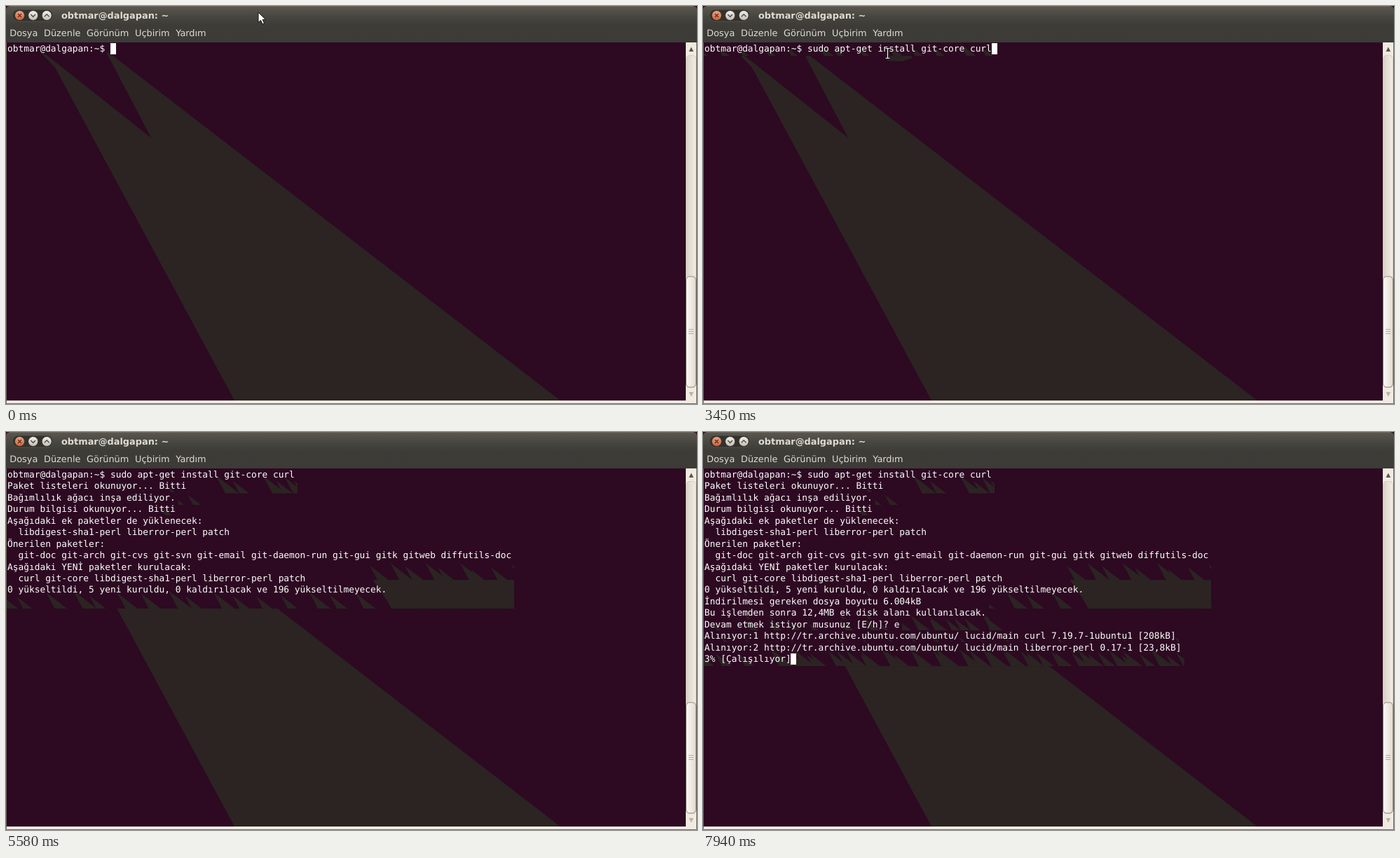
An HTML page with a canvas for the animation above (8000 ms loop, 986 px wide and 568 px high).

```html
<!DOCTYPE html>
<html lang="tr">
<head>
<meta charset="utf-8">
<title>Terminal</title>
<style>
  html, body { margin: 0; width: 100%; height: 100%; overflow: hidden; background: #2d0922; }
  #stage { position: relative; width: 986px; height: 568px; overflow: hidden; text-rendering: geometricPrecision; }
  #stage > * { position: absolute; }
  #chrome, #backdrop { left: 0; top: 0; }
  .bar { font: 12.89px/16px "DejaVu Sans", sans-serif; color: #dfdbd2; white-space: pre; }
  .title { left: 79px; top: 7px; font-weight: bold; }
  .menu { left: 5.3px; top: 32px; display: flex; gap: 8.7px; }
  #screen {
    left: 2px; top: 54px; margin: 0; color: #fff;
    font: 12.85px/16.43px "DejaVu Sans Mono", monospace; font-variant-ligatures: none;
  }
  #caret { width: 8px; height: 16.4px; background: #fff; }
  #mouse { left: 0; top: 0; overflow: visible; }
</style>
</head>
<body>
<div id="stage">
  <canvas id="backdrop" width="986" height="568"></canvas>
  <svg id="chrome" width="986" height="568">
    <defs>
      <linearGradient id="head" x2="0" y2="1">
        <stop offset="0" stop-color="#5b584f"/><stop offset=".28" stop-color="#474640"/>
        <stop offset=".52" stop-color="#3d3c37"/><stop offset="1" stop-color="#3c3b37"/>
      </linearGradient>
      <linearGradient id="trough">
        <stop offset="0" stop-color="#d9d1c5"/><stop offset="1" stop-color="#f3ede4"/>
      </linearGradient>
      <linearGradient id="thumb">
        <stop offset="0" stop-color="#fbf9f6"/><stop offset="1" stop-color="#e3dacd"/>
      </linearGradient>
      <linearGradient id="close" x2="0" y2="1">
        <stop offset="0" stop-color="#eaa78a"/><stop offset="1" stop-color="#cb6339"/>
      </linearGradient>
      <linearGradient id="button" x2="0" y2="1">
        <stop offset="0" stop-color="#f3f1ec"/><stop offset="1" stop-color="#c2bdb2"/>
      </linearGradient>
    </defs>
    <path d="M0 52V6Q0 0 6 0H980Q986 0 986 6V52Z" fill="url(#head)"/>
    <path d="M5 .5H981" stroke="#6d6960"/>
    <rect x="9" y="5" width="58" height="17" rx="8.5" fill="#33322d" stroke="#53514a"/>
    <g stroke="#2b2a26" stroke-width=".8">
      <circle cx="19.5" cy="13.5" r="7" fill="url(#close)"/>
      <circle cx="38.7" cy="13.5" r="7" fill="url(#button)"/>
      <circle cx="58.2" cy="13.5" r="7" fill="url(#button)"/>
    </g>
    <g fill="none" stroke="#55524a" stroke-width="1.5">
      <path d="M17 11l5 5m0-5l-5 5" stroke="#70301a"/>
      <path d="M35.3 12l3.4 3.4 3.4-3.4M54.8 15.2l3.4-3.4 3.4 3.4"/>
    </g>
    <rect x="970" y="52" width="15" height="512" fill="#f0eae0"/>
    <rect x="970.5" y="70.5" width="14" height="474" rx="5" fill="url(#trough)" stroke="#d5cdc0"/>
    <rect x="970.5" y="386" width="14" height="158" rx="5" fill="url(#thumb)" stroke="#91887c"/>
    <path d="M974 461.5h7m-7 3h7m-7 3h7" stroke="#b5ab9d"/>
    <path d="M974.5 65l3.3-6.5 3.3 6.5Z" fill="#5b554d"/>
    <path d="M974.5 551l3.3 6.5 3.3-6.5Z" fill="#bbb2a5"/>
    <rect y="563" width="986" height="5" fill="#f0eae0"/>
    <path d="M.5 52V567.5H985.5V52" fill="none" stroke="#6b665d"/>
  </svg>
  <div class="bar title">obtmar@dalgapan: ~</div>
  <div class="bar menu">
    <span>Dosya</span><span>Düzenle</span><span>Görünüm</span><span>Uçbirim</span><span>Yardım</span>
  </div>
  <div id="caret"></div>
  <pre id="screen"></pre>
  <svg id="mouse" width="1" height="1">
    <path id="arrow" d="M.5 .5V15L4 11.8 6.4 17.2 9 16 6.6 10.8H11Z" fill="#fff" stroke="#111"/>
    <g id="beam" fill="none">
      <path d="M-3.5-7H3.5M0-7V7M-3.5 7H3.5" stroke="#111" stroke-width="3"/>
      <path d="M-3-7H3M0-7V7M-3 7H3" stroke="#fff" stroke-width="1.2"/>
    </g>
  </svg>
</div>
<script>
const LOOP = 8000, TOP = 53, ROW = 16.43, LEFT = 2, COL = 7.736;
const BLINK_OFF = 580, BLINK = 1190;
const PURPLE = '#2d0922', GREY = '#2b2422';
const $ = id => document.getElementById(id);
const ctx = $('backdrop').getContext('2d');
const rowY = row => TOP + row * ROW;
const endX = line => LEFT + line.length * COL;

const prompt = 'obtmar@dalgapan:~$ ';
const command = prompt + 'sudo apt-get install git-core curl';
const reading = 'Paket listeleri okunuyor... ';
const tree = 'Bağımlılık ağacı inşa ediliyor.';
const mirror = 'http://tr.archive.ubuntu.com/ubuntu/ lucid/main ';
const question = 'Devam etmek istiyor musunuz [E/h]? ';

// The caret stands after the last line written and first hides after `lag` ms
const writes = [];
const write = (at, row, lines, lag = 595) => writes.push({ at, row, lines, lag });

write(0, 0, [prompt], 305);
write(2650, 0, [command], 215);
write(4630, 0, [command, '']);
write(4760, 1, [reading + '%0']);
write(5010, 1, [reading + '%27']);
write(5080, 1, [reading + '%84']);
write(5150, 1, [reading + 'Bitti', tree + '.. %0']);
write(5210, 2, [tree + '.. %50']);
write(5380, 2, [tree, 'Durum bilgisi okunuyor... Bitti', '']);
write(5580, 4, [
  'Aşağıdaki ek paketler de yüklenecek:',
  '  libdigest-sha1-perl liberror-perl patch',
  'Önerilen paketler:',
  '  git-doc git-arch git-cvs git-svn git-email git-daemon-run git-gui gitk gitweb diffutils-doc',
  'Aşağıdaki YENİ paketler kurulacak:',
  '  curl git-core libdigest-sha1-perl liberror-perl patch',
  '0 yükseltildi, 5 yeni kuruldu, 0 kaldırılacak ve 196 yükseltilmeyecek.',
  ''
], 0);
write(5620, 11, [
  'İndirilmesi gereken dosya boyutu 6.004kB',
  'Bu işlemden sonra 12,4MB ek disk alanı kullanılacak.',
  question
], 215);
write(6750, 13, [question + 'e']);
write(7690, 14, ['']);
write(7780, 14, [`Alınıyor:1 ${mirror}curl 7.19.7-1ubuntu1 [208kB]`, '0% [Çalışılıyor]']);
write(7940, 15, [`Alınıyor:2 ${mirror}liberror-perl 0.17-1 [23,8kB]`, '3% [Çalışılıyor]']);

function fill(color, ...points) {
  ctx.fillStyle = color;
  ctx.beginPath();
  points.forEach(([x, y]) => ctx.lineTo(x, y));
  ctx.fill();
}

function random(seed) {
  const v = Math.sin(seed * 12.9898) * 43758.5453;
  return v - Math.floor(v);
}

// A small copy of the wallpaper wedge
const shard = (x, y, h) => fill(GREY, [x, y], [x + .53 * h, y + h], [x + 1.3 * h, y + h]);

function shards(from, to, bottom, height, gap) {
  for (let x = from; x < to; x += gap) {
    const k = random(x + bottom), h = height * (.6 + .4 * k);
    shard(x + gap * .4 * k, bottom - h, h);
  }
}

// Written rows are repainted purple; the wallpaper returns in shards
// along the bottom and beside the lines shorter than the longest one.
function repaint({ row, lines }) {
  const widest = lines.reduce((best, line, i) => line.length > lines[best].length ? i : best, 0);
  const last = lines.filter(Boolean).pop() || '';
  const top = rowY(row), bottom = rowY(row + lines.length) + 2;
  const right = endX(lines[widest]) + 4;
  const open = rowY(row + widest + 1) + 2;
  ctx.save();
  ctx.beginPath();
  ctx.rect(0, top, right, bottom - top);
  ctx.clip();
  ctx.fillStyle = PURPLE;
  ctx.fillRect(0, top, right, bottom - top);
  shards(-20, right, bottom, Math.min(ROW * 1.6, bottom - top), 34);
  if (open < bottom) {
    const solid = open + 1.5 * ROW, x = endX(last);
    shards(x - 30, right, Math.min(solid, bottom), 1.5 * ROW, 25);
    if (solid < bottom) fill(GREY, [x - 20, solid], [x + 8, bottom], [right, bottom], [right, solid]);
  }
  ctx.restore();
}

function drawBackdrop(t) {
  ctx.fillStyle = PURPLE;
  ctx.fillRect(0, 0, 986, 568);
  fill(GREY, [49, 66], [58, 70], [207, 188], [143, 66], [150, 69], [791, 563], [326, 563], [70, 88]);
  if (t >= 900) {
    fill(GREY, [262, 66], [274, 70], [300, 70], [297, 75], [283, 79], [263, 78]);
    shard(312, 58, 10);
  }
  writes.slice(1).filter(w => w.at <= t).forEach(repaint);
}

function drawMouse(t) {
  const s = t < 230 ? 0 : Math.min(17, Math.floor((t - 230) / 41.8) + 1) / 17;
  const u = 1 - s;
  const bezier = (a, b, c, d) => u * u * u * a + 3 * u * u * s * b + 3 * u * s * s * c + s * s * s * d;
  const x = Math.round(bezier(359, 350, 310, 263)), y = Math.round(bezier(8, 40, 80, 67));
  const overText = y > 52;
  $('mouse').style.transform = `translate(${x + .5}px, ${y + .5}px)`;
  $('mouse').style.display = t < 4630 ? '' : 'none';
  $('arrow').style.display = overText ? 'none' : '';
  $('beam').style.display = overText ? '' : 'none';
}

function drawText(t) {
  const past = writes.filter(w => w.at <= t), screen = [];
  for (const { row, lines } of past) lines.forEach((line, i) => screen[row + i] = line);
  $('screen').textContent = screen.join('\n');

  const { at, row, lines, lag } = past.pop();
  const age = t - at - lag;
  const caret = $('caret').style;
  caret.display = age >= 0 && age % BLINK < BLINK_OFF ? 'none' : '';
  caret.left = Math.floor(endX(lines[lines.length - 1]) + .1) + 'px';
  caret.top = rowY(row + lines.length - 1) + 'px';
}

function frame() {
  const t = performance.now() % LOOP;
  drawBackdrop(t);
  drawText(t);
  drawMouse(t);
  requestAnimationFrame(frame);
}
frame();
</script>
</body>
</html>
```
